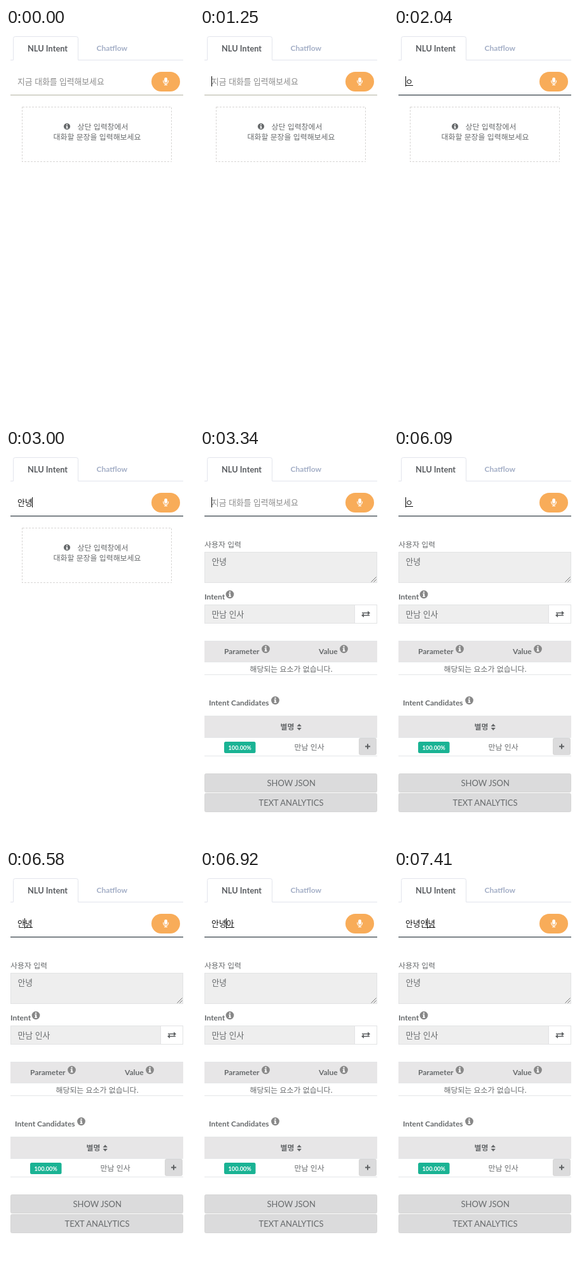
Write an HTML page that moves like this. It is 296 px wide and 619 px high and loops after 8000 ms.

```html
<!DOCTYPE html>
<html lang="ko">
<head>
<meta charset="utf-8">
<title>NLU Intent</title>
<style>
  html, body { margin: 0; width: 100%; height: 100%; overflow: hidden; background: #fff; }
  svg { display: block; width: 296px; height: 619px; }
  text { font: 12px Lato, "Noto Sans CJK KR", "Noto Sans CJK JP", sans-serif; fill: #676a6c; }
  .ko { font-family: "Noto Sans CJK KR", "Noto Sans CJK JP", sans-serif; font-size: 11.9px; font-weight: 350; }
  .big { font-size: 12.8px; }
  .bold { font-weight: 700; }
  .medium { font-weight: 500; }
  .crisp { shape-rendering: crispEdges; }
  .field { fill: #eee; stroke: #e2e3e4; }
  .head { fill: #e7e6e7; }
  .rule { fill: #e4e6e8; }
  .button { fill: #dbdbdc; stroke: #d6d6d6; }
</style>
</head>
<body>
<svg viewBox="0 0 296 619">
  <defs>
    <g id="info">
      <circle r="6.4"/>
      <path fill="#fff" d="M-1.1-4.4h2.2v2h-2.2zM-1.8-1.4h2.9v4h.9v1.4h-3.9V2.6h.9V0h-.8z"/>
    </g>
  </defs>

  <!-- Tabs -->
  <path d="M7 50.5h4.5v-34q0-3 3-3h96q3 0 3 3v34H279" fill="none" stroke="#e2e4ec"/>
  <text class="big bold" x="34" y="37" style="fill:#5a5d61">NLU Intent</text>
  <text class="bold" x="142.5" y="36" style="fill:#a3aec6">Chatflow</text>

  <!-- Input row -->
  <text id="hint" class="ko big" x="18" y="88.5" style="fill:#8c8c8c">지금 대화를 입력해보세요</text>
  <text id="typed" class="ko big" x="18" y="88.5" style="fill:#111"></text>
  <rect id="compose" class="crisp" y="90" width="12" height="1" fill="#111"/>
  <rect id="caret" class="crisp" y="76" width="1" height="16" fill="#000"/>
  <rect id="line" x="7" y="105" width="272" height="1.2"/>
  <rect x="229" y="69" width="45" height="31" rx="15.5" fill="#f8ac59"/>
  <g fill="none" stroke="#fff" stroke-width="1.2">
    <rect x="249.2" y="78" width="4.8" height="8" rx="2.4" fill="#fff" stroke="none"/>
    <path d="M247.7 82.5v1.3a3.9 3.9 0 0 0 7.8 0v-1.3M251.6 87.5v2M249.2 89.6h4.8"/>
  </g>

  <g id="intro">
    <rect class="crisp" x="25.5" y="124.5" width="235" height="86" fill="none" stroke="#d8d6d5" stroke-dasharray="3 2"/>
    <use href="#info" transform="translate(96 155) scale(.8)" fill="#676a6c"/>
    <text class="ko" x="112.5" y="160">상단 입력창에서</text>
    <text class="ko" x="74.5" y="176">대화할 문장을 입력해보세요</text>
  </g>

  <g id="result">
    <text class="ko medium" x="7" y="154.5">사용자 입력</text>
    <rect class="field crisp" x="7.5" y="162.5" width="271" height="48"/>
    <text class="ko big" x="18.5" y="182">안녕</text>
    <path d="M269.5 209.5l8-8M273.5 209.5l4-4" stroke="#777"/>

    <text class="bold" x="7" y="237">Intent</text>
    <rect class="field crisp" x="7.5" y="245.5" width="236" height="29"/>
    <rect class="crisp" x="243.5" y="245.5" width="35" height="29" fill="#fff" stroke="#e2e3e4"/>
    <text class="ko big" x="18.5" y="265">만남 인사</text>
    <path d="M255 257.4h9V255l4 3.2-4 3.2V259h-9zM267 261.2h-9v-2.4l-4 3.2 4 3.2v-2.4h9z" fill="#5f6264"/>

    <rect class="head crisp" x="7" y="303" width="272" height="32"/>
    <path class="rule crisp" d="M7 302h272v1H7zM7 335h272v1H7zM7 355h272v1H7z"/>
    <text class="bold" x="38" y="323">Parameter</text>
    <text class="bold" x="187" y="323">Value</text>
    <text class="ko" x="78.5" y="350.5">해당되는 요소가 없습니다.</text>

    <text class="bold" x="14" y="404">Intent Candidates</text>
    <rect class="head crisp" x="7" y="421" width="272" height="33"/>
    <path class="rule crisp" d="M7 420h272v1H7zM7 454h272v1H7zM7 483h272v1H7z"/>
    <text class="ko bold" x="126.5" y="442">별명</text>
    <path d="M152.5 437l3.7-4.2 3.7 4.2zM152.5 439l3.7 4.2 3.7-4.2z" fill="#676a6c"/>
    <rect x="38" y="461" width="49.5" height="18" rx="2.5" fill="#1ab394"/>
    <text class="bold" x="44.5" y="473.5" style="fill:#fff;font-size:9.2px">100.00%</text>
    <text class="ko" x="148.5" y="474">만남 인사</text>
    <rect class="button" x="250.5" y="455.5" width="27" height="26" rx="2"/>
    <path d="M260 468.5h8M264 464.5v8" stroke="#5f6264" stroke-width="2"/>

    <g fill="#888">
      <use href="#info" x="47" y="229"/>
      <use href="#info" x="103.5" y="315"/>
      <use href="#info" x="226.5" y="315"/>
      <use href="#info" x="118.5" y="396"/>
    </g>

    <rect class="button" x="7.5" y="511.5" width="271" height="29" rx="2"/>
    <rect class="button" x="7.5" y="542.5" width="271" height="29" rx="2"/>
    <text x="105.5" y="531" style="font-size:13px">SHOW JSON</text>
    <text x="92.5" y="562" style="font-size:13px">TEXT ANALYTICS</text>
  </g>
</svg>

<script>
  const LOOP = 8000, LEFT = 18, PITCH = 11.8, RESULT_AT = 3340;
  const $ = id => document.getElementById(id);

  // [start, color]
  const lineSteps = [
    [0, '#bdbcae'], [100, '#d3d4cf'], [270, '#e5e6e7'], [1250, '#bdbcae'], [1420, '#2f3a42']
  ];

  // [start, text, caret column or -1, last syllable is being composed]
  const inputSteps = [
    [0, '', -1], [1250, '', 0], [1740, '', -1],
    [2040, 'ㅇ', 0, true], [2380, '아', 0, true], [2530, '안', 0, true],
    [2690, '안녀', 1, true], [2850, '안녕', 1, true], [3000, '안녕', 2],
    [3340, '', 0], [3810, '', -1], [4300, '', 0], [4960, '', -1], [5450, '', 0],
    [5940, 'ㅇ', 0, true], [6100, '아', 0, true], [6270, '안', 0, true],
    [6430, '안녀', 1, true], [6580, '안녕', 1, true],
    [6750, '안녕ㅇ', 2, true], [6920, '안녕아', 2, true], [7090, '안녕안', 2, true],
    [7250, '안녕안녀', 3, true], [7410, '안녕안녕', 3, true]
  ];

  const stepAt = (steps, t) => steps.findLast(step => step[0] <= t);
  const show = (id, on) => $(id).setAttribute('visibility', on ? 'visible' : 'hidden');
  const columnX = column => Math.round(LEFT + column * PITCH);

  function draw(t) {
    const [, text, caret, composing] = stepAt(inputSteps, t);
    $('typed').textContent = text;
    $('caret').setAttribute('x', columnX(caret) - (caret > 0 ? 1 : 0));
    $('compose').setAttribute('x', columnX(text.length - 1));
    $('line').setAttribute('fill', stepAt(lineSteps, t)[1]);
    show('hint', !text);
    show('caret', caret >= 0);
    show('compose', composing);
    show('intro', t < RESULT_AT);
    show('result', t >= RESULT_AT);
  }

  const start = performance.now();
  function tick() {
    draw((performance.now() - start) % LOOP);
    requestAnimationFrame(tick);
  }
  tick();
</script>
</body>
</html>
```
